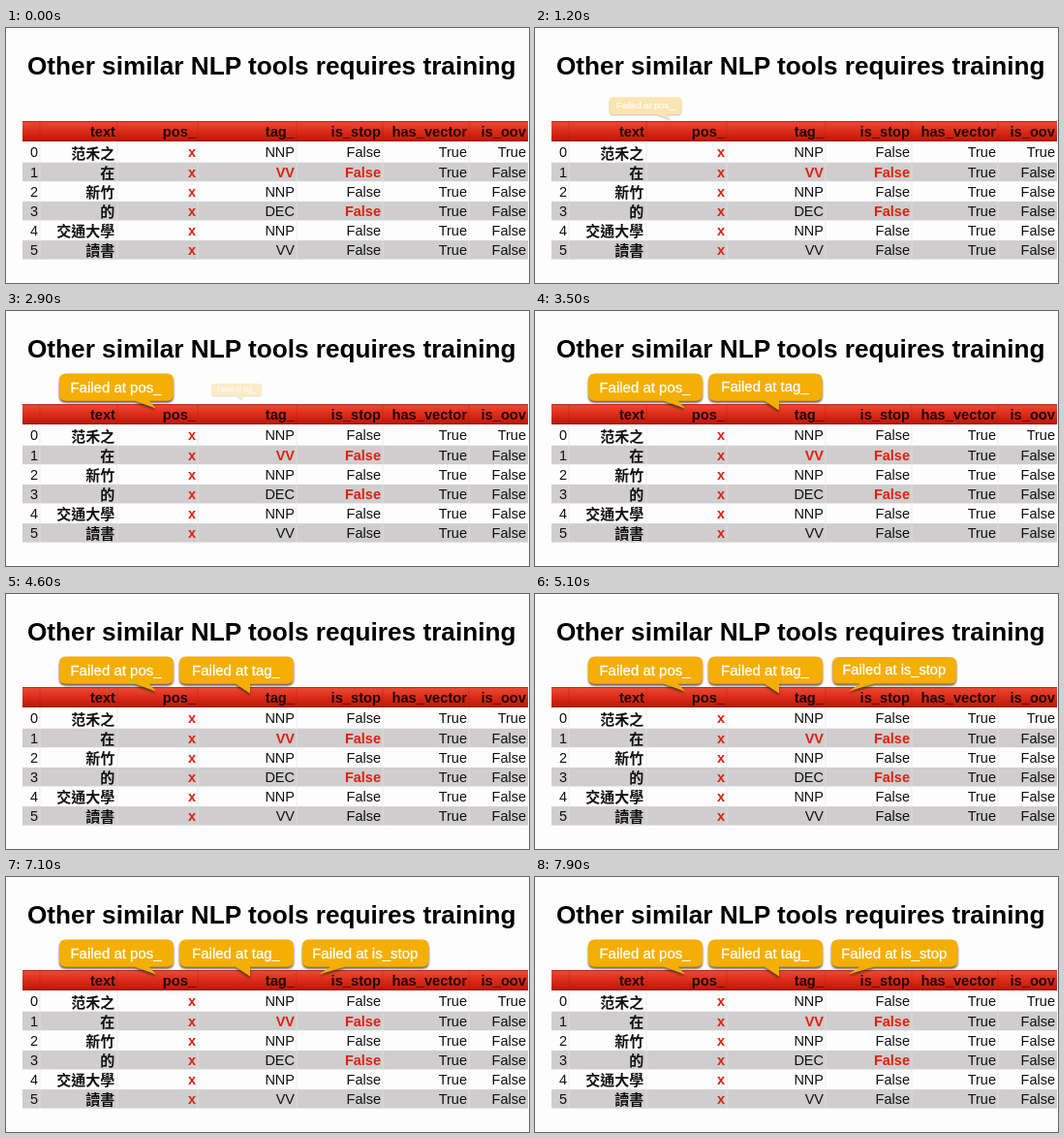
Animation, 540 px wide and 263 px high, one loop 8000 ms. Source, as an HTML page:

```html
<!DOCTYPE html>
<html lang="en">
<head>
<meta charset="utf-8">
<style>
  html, body { margin: 0; width: 100%; height: 100%; overflow: hidden; background: #fdfdfd; }
  svg { display: block; width: 540px; height: 263px; }
  text { font: 14.5px "Liberation Sans", Arial, sans-serif; fill: #111; }
  .cell { text-anchor: end; }
  .title { font-size: 26.2px; font-weight: bold; fill: #000; }
  .head { font-size: 14.7px; font-weight: bold; fill: #200502; }
  .bad { font-weight: bold; fill: #e0200f; }
  .word { font: 700 15px "Noto Sans CJK TC", "Noto Sans CJK", sans-serif; }
  .note { font-size: 15px; fill: #fff; stroke: #fff; stroke-width: .3; text-anchor: middle; }
  .bubble { filter: drop-shadow(0 2px 1.2px rgba(50, 40, 20, .75)); }
</style>
</head>
<body>
<svg viewBox="0 0 540 263">
  <defs>
    <linearGradient id="red" x2="0" y2="1">
      <stop offset="0" stop-color="#ee4a37"/>
      <stop offset=".5" stop-color="#dc2c19"/>
      <stop offset="1" stop-color="#b91607"/>
    </linearGradient>
  </defs>
  <text class="title" x="22" y="48">Other similar NLP tools requires training</text>
  <g id="table"></g>
  <g id="bubbles"></g>
</svg>
<script>
const NS = 'http://www.w3.org/2000/svg';
const table = document.getElementById('table');
const layer = document.getElementById('bubbles');

function add(parent, tag, attrs, content = '') {
  const el = document.createElementNS(NS, tag);
  for (const key in attrs) el.setAttribute(key, attrs[key]);
  el.textContent = content;
  return parent.appendChild(el);
}

const ends = [33, 113, 196, 298, 387, 476, 537];
const heads = ['', 'text', 'pos_', 'tag_', 'is_stop', 'has_vector', 'is_oov'];
const rows = [
  ['范禾之', 'NNP', 'True'],
  ['在', 'VV', 'False'],
  ['新竹', 'NNP', 'False'],
  ['的', 'DEC', 'False'],
  ['交通大學', 'NNP', 'False'],
  ['讀書', 'VV', 'False']
];
const top0 = 118, pitch = 20.1;

rows.forEach(([word, tag, oov], r) => {
  const y = top0 + r * pitch;
  if (r % 2) add(table, 'rect', { x: 17, y: y + .6, width: 522, height: pitch - .6, fill: '#cfcdcd' });
  [r, word, 'x', tag, 'False', 'True', oov].forEach((value, c) => {
    const bad = c === 2 || (c === 3 && r === 1) || (c === 4 && (r === 1 || r === 3));
    add(table, 'text', {
      class: 'cell' + (c === 1 ? ' word' : bad ? ' bad' : ''),
      x: ends[c] - (c === 1 ? .7 : 0), y: y + (c === 1 ? 16.9 : 15.4)
    }, value);
  });
});

add(table, 'rect', { x: 17, y: 96, width: 522, height: 21, fill: 'url(#red)' });
add(table, 'path', { d: 'M17 96.5H539M17 116.5H539', stroke: '#8f1509', 'stroke-opacity': .6 });
heads.forEach((name, c) => {
  add(table, 'text', { class: 'cell head', x: ends[c], y: 112 }, name);
  if (c < 6) {
    const x = ends[c] + 2;
    add(table, 'path', { d: `M${x} 96V117`, stroke: '#a81c10', 'stroke-opacity': .45, 'stroke-width': .7 });
    add(table, 'path', { d: `M${x} 118V238.6`, stroke: '#e6e4e4', 'stroke-width': .7 });
  }
});

// Callouts: left edge, width, tail base, tail tip (x, y), start time, label
const bubbles = [
  [55, 118, 133, 155, 100.5, 1120, 'Failed at pos_'],
  [179, 118, 237, 252, 102.5, 2845, 'Failed at tag_'],
  [306, 130.5, 335, 323, 100.5, 4600, 'Failed at is_stop']
].map(([x, w, base, tipX, tipY, start, label]) => {
  const g = add(layer, 'g', { class: 'bubble' });
  const r = 7, right = x + w, top = 64.5, bottom = 92.8;
  add(g, 'path', {
    fill: '#f5ae03',
    d: `M${x + r} ${top}H${right - r}q${r} 0 ${r} ${r}V${bottom - r}q0 ${r} ${-r} ${r}` +
       `H${base + 15}L${tipX} ${tipY}L${base} ${bottom}H${x + r}q${-r} 0 ${-r} ${-r}V${top + r}q0 ${-r} ${r} ${-r}Z`
  });
  add(g, 'text', { class: 'note', x: x + w / 2 - .5, y: 83.5 }, label);
  return { g, start, cx: x + w / 2 };
});

function draw(now) {
  // The motion advances in tenths of a second.
  const time = Math.floor(now % 8000 / 100 + 1e-6) * 100;
  for (const { g, start, cx } of bubbles) {
    const t = Math.max(0, (time - start) / 1000);
    const scale = t > 1 ? 1 : 1 - Math.exp(-7 * t) * Math.cos(11 * t);
    g.setAttribute('transform', `translate(${cx} 83) scale(${scale}) translate(${-cx} -83)`);
    g.setAttribute('opacity', Math.min(1, t / .26));
  }
}

const begin = performance.now();
function loop() {
  draw(performance.now() - begin);
  requestAnimationFrame(loop);
}
loop();
</script>
</body>
</html>
```
